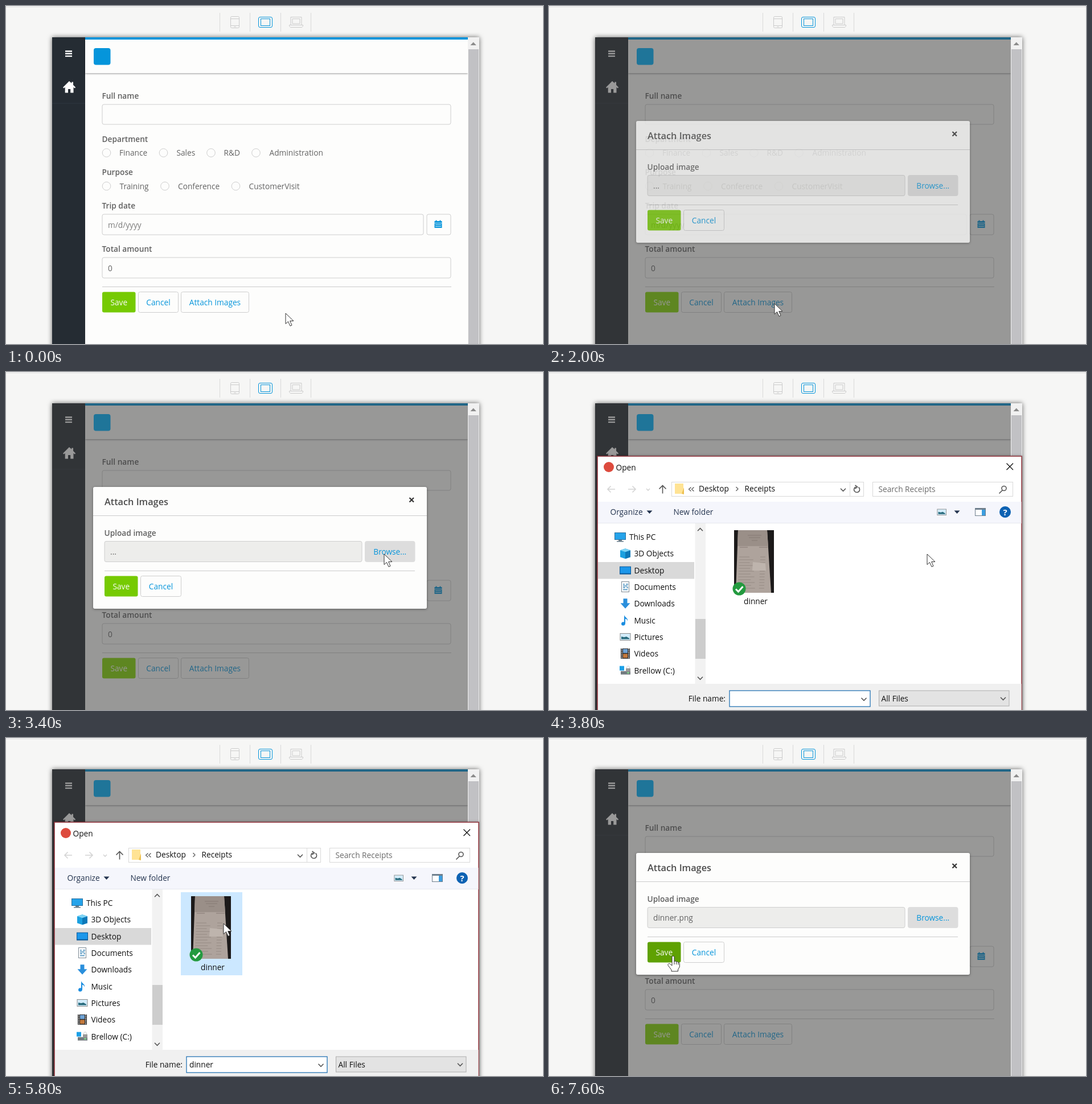
Write an HTML page that moves like this. It is 943x594 px and loops after 8000 ms.

```html
<!DOCTYPE html>
<html lang="en">
<head>
<meta charset="utf-8">
<title>Attach an image</title>
<style>
html, body { margin: 0; height: 100%; overflow: hidden; background: #f6f6f5; }
svg { display: block; width: 100vw; height: 100vh; }
text { font: 13.7px "Open Sans", sans-serif; fill: #636363; }
.label { font-weight: 600; fill: #606060; }
.title { font-size: 16.3px; font-weight: 600; fill: #4c4c4c; }
.mid { text-anchor: middle; }
.end { text-anchor: end; }
.white { fill: #fdfdfc; }
.link { fill: #0595db; }
.hint { fill: #7c7c7c; }
.field { fill: #fdfdfc; stroke: #cecece; }
.off { fill: #ededeb; stroke: #cecece; }
.go { fill: #76ca02; }
.go.hover { fill: #5fa102; }
.gray, .field.hover { fill: #ddd; stroke: #ddd; }
.dim .go { fill: #84d805; }
.dim .logo { fill: #00b4ff; }
.line { fill: none; stroke: #cbcbcb; }
.dark { fill: none; stroke: #555; stroke-width: 1.6; }
.pale { fill: none; stroke: #d4d4d4; stroke-width: 1.6; }
#files text { font-weight: 500; fill: #111; }
#files .tool { fill: #24344f; }
#files .hint { fill: #6a6a6a; }
#cursor path { fill: #fff; stroke: #333; stroke-linejoin: round; }
</style>
</head>
<body>
<svg id="stage" viewBox="0 0 943 594"></svg>
<script>
const text = (x, y, s, cls = '', extra = '') => `<text x="${x}" y="${y}" class="${cls}" ${extra}>${s}</text>`;
const path = (d, cls = '', extra = '') => `<path d="${d}" class="${cls}" ${extra}/>`;
const box = (x, y, w, h, cls = '', extra = '') =>
  `<rect x="${x}" y="${y}" width="${w}" height="${h}" class="${cls}" ${extra}/>`;
const fill = (x, y, w, h, color) => box(x, y, w, h, '', `fill="${color}"`);
const circle = (x, y, r, color) => `<circle cx="${x}" cy="${y}" r="${r}" fill="${color}"/>`;
const shadow = (y, blur, color) => `style="filter:drop-shadow(0 ${y}px ${blur}px ${color})"`;
const field = (x, y, w, h = 36, cls = 'field') => box(x + .5, y + .5, w - 1, h - 1, cls, 'rx="3"');
const button = (x, y, w, label, cls, color, id = '') =>
  box(x + .5, y + .5, w - 1, 36, cls, `rx="3" ${id && `id="${id}"`}`) +
  text(x + w / 2, y + 23.5, label, 'mid ' + color);
const chevron = (x, y, dir = 1, r = 4.5) =>
  path(`M${x - r} ${y - dir * r / 2}l${r} ${dir * r} ${r} ${-dir * r}`, 'dark');
const triangle = (x, y) => path(`M${x - 5} ${y - 2.5}h10l-5 5.5z`, '', 'fill="#24344f"');
const radios = (y, items) => items.map(([x, label, tx]) =>
  `<circle cx="${x}" cy="${y}" r="7.3" class="field"/>` + text(tx, y + 5, label)).join('');

const toolbar =
  fill(0, 0, 943, 1, '#fafafa') + path('M0 1.5H943', '', 'stroke="#dcdcdc"') +
  path('M375.5 12V45M428.5 12V45M482.5 12V45M535.5 12V45', '', 'stroke="#d9d9d9"') +
  box(394.5, 18.5, 15, 20, 'line', 'rx="2"') + path('M394.5 22.5h15m-15 12h15m-9 2h3', 'line') +
  `<g fill="none" stroke="#0595db">${box(443.5, 19.5, 24, 18, '', 'rx="2.5"')}
  ${box(447.5, 22.5, 16, 12)}</g>` +
  path('M500 33V19.5h19V33M503 31V22.5h13V31zM497.5 33.5h24v2l-2 2h-20l-2-2z', 'line');

const app =
  box(81, 55, 750, 560, '', 'fill="#fdfdfc" ' + shadow(0, 4, '#0009')) +
  fill(81, 55, 58, 539, '#252c33') + fill(81, 170.5, 58, 1, '#2f3640') +
  path('M104 79.5h12m-12 4.3h12m-12 4.3h12', '', 'stroke="#fff" stroke-width="2.4"') +
  path('M111 132L100 143l1.5 1.5 2.2-1.8v9.8h5.3V146h4.2v6.5h5.3v-9.8l2.2 1.8 1.5-1.5-4.2-4.2v-5.3h-2.7v2.3z', '', 'fill="#fff"') +
  box(139, 58, 672, 60, '', 'fill="#fdfdfc" ' + shadow(1, 1.5, '#0006')) +
  fill(139, 55, 672, 4, '#0595db') + box(154, 74, 29.5, 29.5, 'link logo', 'rx="4"') +
  text(168.5, 162.5, 'Full name', 'label') + field(168.5, 172.5, 613) +
  text(168.5, 238.5, 'Department', 'label') +
  radios(258, [[176.5, 'Finance', 199], [276.5, 'Sales', 299.5], [360, 'R&amp;D', 382.5], [439, 'Administration', 462.5]]) +
  text(168.5, 297, 'Purpose', 'label') +
  radios(316.5, [[176.5, 'Training', 199.5], [279, 'Conference', 302], [403.5, 'CustomerVisit', 426.5]]) +
  text(168.5, 356, 'Trip date', 'label') + field(168.5, 365.5, 565, 37) + text(179, 389.5, 'm/d/yyyy', 'hint') +
  field(738.5, 365.5, 43, 37) +
  fill(752.5, 378, 13, 12, '#0595db') + path('M755.5 376.5v3m7-3v3', '', 'stroke="#0595db" stroke-width="2"') +
  path('M752.5 381.5h13M754 384.5h10m-10 3h10', '', 'stroke="#fff" stroke-width=".8"') +
  text(168.5, 432, 'Total amount', 'label') + field(168.5, 441.5, 613, 37) + text(179, 465.5, '0') +
  path('M169 493.5H782', 'line') +
  button(168.5, 502, 59.5, 'Save', 'go', 'white') +
  button(232, 502, 71, 'Cancel', 'field', 'link') +
  button(307, 502, 120, 'Attach Images', 'field', 'link', 'attach');

const scrollbar =
  fill(811, 55, 20, 539, '#f1f1f1') + fill(812, 76, 18, 518, '#c1c1c4') +
  path('M815.5 69l5.2-5.5 5.2 5.5z', '', 'fill="#8c8c8c"');

const modal =
  box(153, 202, 586, 214, 'white', 'rx="3" ' + shadow(1, 2, '#0006')) +
  text(173, 233.5, 'Attach Images', 'title') + path('M153 252.5H739', 'line') +
  path('M708.5 221l7.5 7.5m0-7.5l-7.5 7.5', '', 'stroke="#333" stroke-width="2.2"') +
  text(172.5, 287.5, 'Upload image', 'label') + field(172.5, 297, 453, 37, 'off') +
  text(183, 321, '...', '', 'id="chosen"') +
  button(630, 297, 88.5, 'Browse...', 'gray', 'link') + path('M173 349.5H718', 'line') +
  button(172.5, 358, 59.5, 'Save', 'go', 'white', 'save') +
  button(236, 358, 72, 'Cancel', 'field', 'link');

// Icons of the folder tree, each in a 20 x 20 square.
const screen = fill(0, 2, 20, 13, '#2a6f9e') + fill(1, 3, 18, 11, '#25a3ea');
const picture = fill(.5, 3, 19, 13, '#8d8d8d') + fill(1.5, 4, 17, 11, '#d3ecfa') + path('M3 13.5V9l5 1 4-1 5 3v1.5z', '', 'fill="#276a7c"');
const tree = [
  ['This PC', screen + path('M7 15h6v2h3v1.5H4V17h3z', '', 'fill="#6b7f8c"')],
  ['3D Objects', path('M10 1l9 3v12l-9 3-9-3V4z', '', 'fill="#1ba0e0"') + path('M10 7l9-3v12l-9 3z', '', 'fill="#0c78b8"') + path('M10 1l9 3-9 3-9-3z', '', 'fill="#7fd4f5"')],
  ['Desktop', fill(0, 3, 20, 14, '#0b5a9a') + fill(1, 4, 18, 11, '#1c97ea')],
  ['Documents', box(3.5, .5, 13, 18, '', 'fill="#fff" stroke="#7d8a94"') + path('M6 5h3m2 0h4M6 8h8M6 11h4m2 0h3M6 14.5h8', '', 'stroke="#3b86b8" stroke-width="1.5"')],
  ['Downloads', path('M6.5 1h7v8h5L10 18.5 1.5 9h5z', '', 'fill="#2a8fdc"')],
  ['Music', path('M8 0c1 5 7 5 6 11-1-3-2-4-4-4v8c0 5-7 5-7 1 0-3 3-4 5-3z', '', 'fill="#1a8de0"')],
  ['Pictures', picture],
  ['Videos', fill(2, .5, 16, 18, '#2b2b2b') + fill(6, 1.5, 8, 7, '#6ea2d4') + fill(6, 10, 8, 7, '#c3793c') + path('M4 1v18M16 1v18', '', 'stroke="#ddd" stroke-width="2" stroke-dasharray="1.5"')],
  ['Brellow (C:)', fill(0, 2, 8, 8, '#1ba0e8') + fill(2, 11, 17, 6, '#737b80') + fill(13, 13, 4, 2, '#7fe08a') + fill(11, 6, 8, 6, '#999') + path('M12.5 6V4q2.5-4 5 0v2', 'line')],
].map(([name, icon], i) => {
  const y = 290 + i * 29.33, x = i ? 124 : 115;
  return (i == 2 ? fill(86, 334, 169, 29.5, '#d9d9d9') : '') +
    `<g transform="translate(${x} ${y - 10})">${icon}</g>` + text(i ? 149.5 : 141, y + 5, name);
}).join('');

let receiptLines = '';
for (let i = 0; i < 12; i++)
  receiptLines += `M${334 - i * .2} ${325 + i * 5}h${18 + i * 7 % 13}m${19 - i * 7 % 13} 0h9`;
const photo =
  fill(325, 278, 70, 110, '#1c1a1a') +
  path('M332 278h51l7 110h-62z', '', 'fill="#aea39c"') + path('M332 278h51l2 28h-54z', '', 'fill="#9a8f88"') +
  path('M349 287h24m-22 4h20m-15 5h10M335 308h14m20 0h15', '', 'stroke="#867a74"') +
  path(receiptLines, '', 'stroke="#958a83"') + path('M358 334l22 2 1 13-24 0z', '', 'fill="#beb4ad"') +
  circle(334, 381, 11.5, '#239a3f') + path('M328 381.5l4.5 4.5 8-9', '', 'fill="none" stroke="#fff" stroke-width="3"');

const files =
  box(85, 148, 745, 470, '', 'fill="#fff" stroke="#8f3039" stroke-width="1.5" ' + shadow(0, 2, '#0005')) +
  circle(105, 167, 9, '#dd4b3e') + text(117.5, 172.5, 'Open') +
  path('M803.5 160.5l11.5 11.5m0-11.5l-11.5 11.5', '', 'stroke="#111" stroke-width="1.3"') +
  path('M116 206h-13m5.5-5.5l-5.5 5.5 5.5 5.5M139 206h13m-5.5-5.5l5.5 5.5-5.5 5.5M171 205l3 3 3-3', 'pale') +
  path('M199.5 213.5v-14m-6 6l6-6 6 6', 'dark') +
  `<g fill="#fff" stroke="#d9d9d9">${box(215.5, 193.5, 337, 25)}${path('M528.5 194v25')}${box(568.5, 193.5, 246, 25)}</g>` +
  fill(221, 196, 15, 18, '#ffe394') + path('M233 214l4-11v12z', '', 'fill="#edc04f"') +
  path('M249.5 202.5l-4 3.5 4 3.5m5-7l-4 3.5 4 3.5M328.5 202l3.5 3.5-3.5 3.5', 'dark', 'style="stroke-width:1.2"') +
  text(263, 210, 'Desktop') + text(343.5, 210, 'Receipts') + chevron(516.5, 207) +
  path('M543.5 202.5a5 5 0 1 1-5-.5m-1-3l4 3-4 3', 'dark') +
  text(578.5, 210.5, 'Search Receipts', 'hint') +
  path('M796 208l-5.5 5.5M803 204.5a4 4 0 1 1-8 0 4 4 0 1 1 8 0', 'dark') +
  fill(86, 228, 743.5, 37.5, '#f5f6fc') + fill(86, 265, 743.5, 1, '#e6e8ee') +
  text(107.5, 251, 'Organize', 'tool') + triangle(176.5, 246) + text(218.5, 251, 'New folder', 'tool') +
  `<g transform="translate(681 238) scale(.87)">${picture}</g>` + triangle(716.5, 246) +
  box(748.5, 239.5, 18, 13, '', 'fill="#fff" stroke="#6f7f8d"') + fill(748, 239, 19, 3, '#6f7f8d') + fill(760, 242, 6, 10, '#3c9ee0') +
  circle(801, 246, 10, '#0d62b3') + text(801, 251.5, '?', 'mid', 'style="font-weight:700;fill:#fff;font-size:15px"') +
  tree +
  fill(256.5, 266, 18.5, 282, '#f2f2f2') + fill(257, 434, 18, 70, '#cdcdcd') + chevron(265.5, 277, -1) + chevron(265.5, 538) +
  box(307, 271, 108, 146, '', 'id="pick"') + photo + text(363, 407.5, 'dinner', 'mid') +
  fill(86, 548, 743.5, 50, '#f0f0f0') + text(310, 578.5, 'File name:', 'end') +
  box(317, 560, 247, 28, '', 'fill="#fff" stroke="#2673b4" stroke-width="1.3"') + text(322, 579, '', '', 'id="fileName"') +
  chevron(553, 575) + box(579.5, 560, 228.5, 27, '', 'fill="#e3e3e3" stroke="#adadad"') +
  text(583.5, 578.5, 'All Files') + chevron(797.5, 574);

const cursor =
  path('M0 0V18.5L4.5 14.5 8 22.3 11 21 7.7 13.5H14z', '', 'id="arrow"') +
  `<g id="hand">${path('M-2 2C-2-.5 2-.5 2 2V10C3 8.5 5.5 9 5.7 10.8 6.7 9.5 8.7 10 9 11.8 10 11 11.3 12 11.3 13.5V19L8.5 24V27H-3V24.5L-9 16.5C-9.5 14-7.5 12.5-5.5 14L-2 17z')}
  ${path('M2 10v5m3.7-4v4m3.3-3v3.5')}</g>`;

const $ = id => document.getElementById(id);
$('stage').innerHTML = toolbar + `<g id="app">${app}</g>` +
  box(81, 55, 730, 539, '', 'id="shade" fill="#3c3c3c" opacity=".52"') + scrollbar +
  `<g id="modal">${modal}</g><g id="files">${files}</g><g id="cursor">${cursor}</g>`;

// Pointer path: time, x, y
const stops = [
  [0, 491, 540], [1400, 398, 523], [2000, 396, 523], [3400, 664, 320], [3800, 664, 320],
  [4800, 441, 317], [5300, 382, 326], [6400, 382, 326], [7600, 218, 383], [8000, 218, 383],
];
const slope = (i, k) => (stops[i + 1][k] - stops[i][k]) / (stops[i + 1][0] - stops[i][0]);

// Speed at a stop: flows through, but rests where the motion halts or turns back.
function speed(i, k) {
  if (i == 0 || i == stops.length - 1) return 0;
  const a = slope(i - 1, k), b = slope(i, k);
  return a * b > 0 ? 2 * a * b / (a + b) : 0;
}

function pointer(t) {
  const i = stops.findIndex(s => s[0] > t) - 1;
  const a = stops[i], b = stops[i + 1], span = b[0] - a[0];
  const u = (t - a[0]) / span, v = 1 - u, e = u * u * (3 - 2 * u);
  return [1, 2].map(k => a[k] + (b[k] - a[k]) * e + span * u * v * (v * speed(i, k) - u * speed(i + 1, k)));
}

const show = (id, on) => $(id).style.display = on ? '' : 'none';

function draw(now) {
  const t = Math.floor(now % 8000 / 200) * 200;
  const [x, y] = pointer(t);
  const open = t >= 2000;
  const onAttach = !open && x < 427 && y < 539;
  const onSave = t > 6400 && x < 232 && y > 358;
  const picked = t >= 5600;
  $('app').classList.toggle('dim', open);
  $('attach').classList.toggle('hover', onAttach);
  $('save').classList.toggle('hover', onSave);
  show('shade', open);
  show('modal', open);
  $('modal').style.opacity = t < 2200 ? .75 : 1;
  $('chosen').textContent = t < 6000 ? '...' : 'dinner.png';
  show('files', t >= 3800 && t < 6000);
  $('pick').setAttribute('fill', picked ? '#cce8ff' : x < 415 ? '#e5f3ff' : 'none');
  $('fileName').textContent = picked ? 'dinner' : '';
  $('cursor').setAttribute('transform', `translate(${x} ${y})`);
  show('hand', onAttach || onSave);
  show('arrow', !(onAttach || onSave));
  requestAnimationFrame(draw);
}
draw(performance.now());
</script>
</body>
</html>
```
